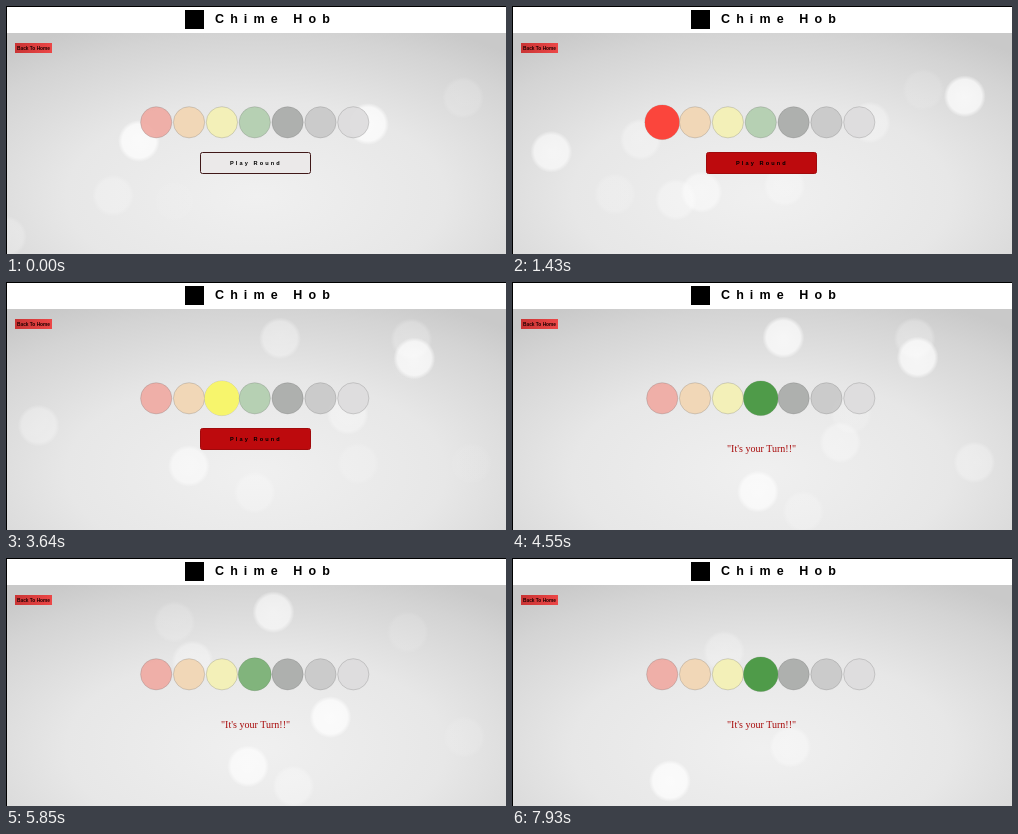
Animation, 500 px wide and 248 px high, one loop 8 s. Source, as an HTML page with a canvas:

```html
<!DOCTYPE html>
<html lang="en">
<meta charset="utf-8">
<title>Chime Hob</title>
<style>
  html, body { margin: 0; width: 100%; height: 100%; overflow: hidden; background: #fff; }
  canvas { display: block; }
</style>
<canvas id="stage" width="500" height="248"></canvas>
<script>
const ctx = document.getElementById('stage').getContext('2d');
const LOOP = 8000, STEP = 130, NOTE = 520, TURN = 4290;

const pads = ['#efaaa2', '#f1d5b3', '#f3f0b4', '#b2cdae', '#a9aba9', '#cacaca', '#dddcdd'];
const litColors = { 0: '#fb453c', 2: '#f7f56c', 3: '#4f9b49' };

// The melody plays once, then the player repeats it a little faster.
const melody = [0, 3, 2, 3];
const notes = melody.flatMap((pad, i) => [
  { pad, start: 1170 + 1040 * i },
  { pad, start: 5070 + 845 * i }
]);

let seed = 7;
const random = () => (seed = seed * 16807 % 2147483647) / 2147483647;

// Bright lights: place and second of greatest strength
const brightLights = [
  [133, 135, 0], [362, 118, 0], [452, 90, 1.7], [37, 145, 2.2], [186, 185, 2.6],
  [407, 76, 4.1], [270, 55, 5], [244, 209, 5.2], [324, 159, 6], [158, 223, 7.9]
].map(([x, y, peak]) => ({ x, y, peak, alpha: .8, fade: 1.9 }));

const faintLights = Array.from({ length: 14 }, (_, i) => ({
  x: random() * 500, y: 30 + random() * 218, peak: i * .6, alpha: .2 + random() * .2, fade: 1.3
}));

const lights = [...faintLights, ...brightLights];

const clamp = v => Math.max(0, Math.min(1, v));

function gradient(g, ...stops) {
  stops.forEach(([at, color]) => g.addColorStop(at, color));
  return g;
}

function disc(x, y, r, fill) {
  ctx.beginPath();
  ctx.arc(x, y, r, 0, Math.PI * 2);
  ctx.fillStyle = fill;
  ctx.fill();
}

function label(text, x, y, font, color = '#000', spacing = 0) {
  ctx.font = font;
  ctx.letterSpacing = spacing + 'px';
  ctx.fillStyle = color;
  ctx.fillText(text, x, y);
}

function drawLight({ x, y, peak, alpha, fade }, s) {
  const dt = s - peak, strength = alpha * (1 - (dt / fade) ** 2);
  if (strength <= 0) return;
  const cx = x - 3 * dt, cy = y - dt;
  const white = a => `rgba(255,255,255,${a * strength})`;
  disc(cx, cy, 21, gradient(ctx.createRadialGradient(cx, cy, 0, cx, cy, 21),
    [0, white(1)], [.8, white(.9)], [1, white(0)]));
}

function drawBackdrop(s) {
  ctx.save();
  ctx.translate(250, 190);
  ctx.scale(2, 1);
  ctx.fillStyle = gradient(ctx.createRadialGradient(0, 0, 0, 0, 0, 190),
    [0, '#f0f0f0'], [.5, '#e7e7e7'], [.85, '#d4d4d4'], [1, '#c9c9c9']);
  ctx.fillRect(-125, -190, 250, 250);
  ctx.restore();
  lights.forEach(light => drawLight(light, s));
}

function drawHeader() {
  ctx.fillStyle = '#fff';
  ctx.fillRect(0, 0, 500, 27);
  ctx.fillStyle = '#000';
  ctx.fillRect(0, 0, 500, 1);
  ctx.fillRect(0, 0, 1, 248);
  ctx.fillRect(179, 4, 19, 19);
  label('Chime Hob', 209, 17, 'bold 12.5px "Liberation Sans", sans-serif', '#000', 6.1);

  ctx.fillStyle = gradient(ctx.createLinearGradient(9, 0, 46, 0), [0, '#c93434'], [1, '#ec4747']);
  ctx.fillRect(9, 37, 37, 10);
  label('Back To Home', 11, 44, 'bold 4.8px "Liberation Sans", sans-serif', '#200');
}

function glowOf(pad, t) {
  const levels = notes.filter(note => note.pad === pad).map(({ start }) =>
    Math.min(clamp((t - start + STEP) / STEP), clamp((start + NOTE - t) / STEP)));
  return Math.max(0, ...levels);
}

function drawPads(t) {
  pads.forEach((color, i) => {
    const glow = glowOf(i, t), x = 150.2 + i * 32.85, r = 15.6 + 1.7 * glow;
    ctx.globalAlpha = .93;
    disc(x, 116.3, r, color);
    ctx.strokeStyle = 'rgba(110,110,110,.4)';
    ctx.lineWidth = .7;
    ctx.stroke();
    if (glow) {
      ctx.globalAlpha = glow;
      disc(x, 116.3, r, litColors[i]);
    }
    ctx.globalAlpha = 1;
  });
}

function drawPrompt(t) {
  if (t >= TURN) {
    label('"It\'s your Turn!!"', 215, 170, '10px "Liberation Serif", serif', '#a80c0c');
    return;
  }
  const pressed = t >= 780;
  ctx.beginPath();
  ctx.roundRect(194.5, 146.5, 110, 21, 2);
  ctx.fillStyle = pressed ? '#bd0a0d' : '#ebe9e9';
  ctx.fill();
  ctx.strokeStyle = pressed ? '#a00a0c' : '#401818';
  ctx.lineWidth = 1;
  ctx.stroke();
  label('Play Round', 224, 159, 'bold 5.6px "Liberation Sans", sans-serif', '#000', 2.1);
}

function draw() {
  const t = Math.floor((performance.now() - begin) % LOOP / STEP) * STEP;
  drawBackdrop(t / 1000);
  drawHeader();
  drawPads(t);
  drawPrompt(t);
  requestAnimationFrame(draw);
}

const begin = performance.now();
draw();
</script>
</html>
```
